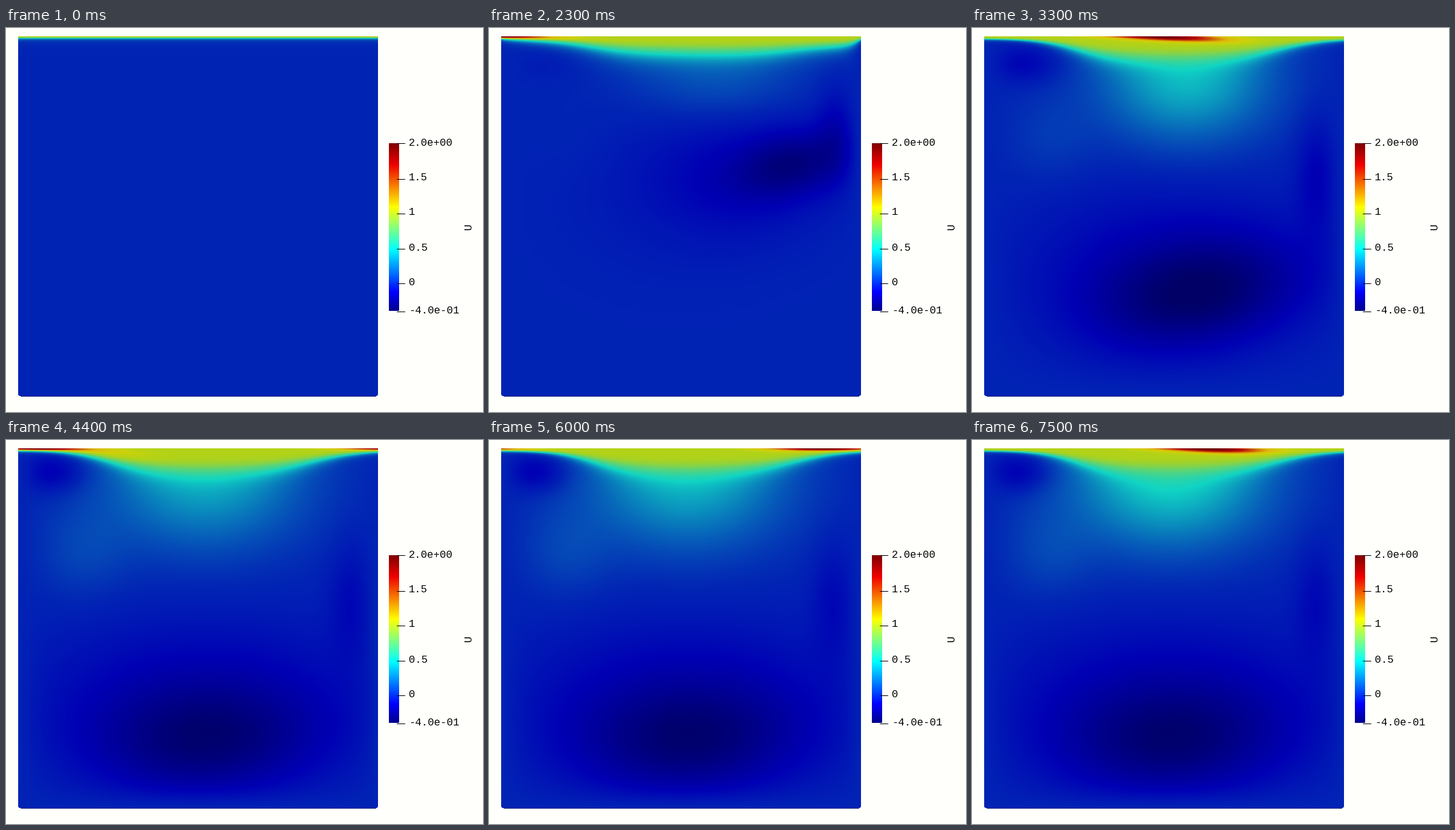
Animation of 745 by 600 pixels, one loop 8.4 s. Source, as a matplotlib script:

```python
import numpy as np
import matplotlib.pyplot as plt
from matplotlib.animation import FuncAnimation
from matplotlib.colors import LinearSegmentedColormap
from matplotlib.patches import FancyBboxPatch

W, H, DPI = 745, 600, 100
FRAMES, INTERVAL = 84, 100
START, LAST_STEP = 20, 50
PAUSES = (32, 39, 53, 63, 73)
LEFT, RIGHT, TOP, BOTTOM = 19, 581, 13, 575
SIZE = RIGHT - LEFT
U_MIN, U_MAX = -0.4, 2.0
PX = 72 / DPI


def make_cmap(name, stops):
    return LinearSegmentedColormap.from_list(name, stops, N=1024)


BAR_CMAP = make_cmap("bar", [
    (0, "#00008f"), (0.111, "#0000ff"), (0.365, "#00ffff"), (0.492, "#80ff80"),
    (0.619, "#ffff00"), (0.873, "#f00000"), (1, "#800000")])

# The surface is lit, so its colours are darker than the legend's.
FIELD_CMAP = make_cmap("field", [
    (0, "#000066"), (0.111, "#0000b4"), (0.1667, "#0224b4"), (0.365, "#10d4c4"),
    (0.492, "#64d46e"), (0.583, "#b2d218"), (0.619, "#cdd20a"), (0.69, "#deb908"),
    (0.8, "#c8460a"), (0.873, "#b40a05"), (1, "#6e0000")])

# Cell centres in stage pixels
x = np.linspace(LEFT + 1, RIGHT - 1, SIZE // 2)
y = np.linspace(TOP + 0.5, BOTTOM - 0.5, SIZE)[:, None]
depth = y - TOP
xi = (x - LEFT) / SIZE
walls = (np.tanh((x - LEFT) / 30) * np.tanh((RIGHT - x) / 22)
         * np.tanh((BOTTOM - y) / 25))

# Each blob: x, y, x radius, y radius, strength when young, rolling up, settled
CORE = np.array([(535, 98, 45, 32, -0.20), (420, 325, 125, 65, -0.30), (310, 475, 170, 85, -0.27)])
BROAD = np.array([(460, 110, 120, 60, -0.09), (320, 350, 160, 130, -0.14), (305, 400, 260, 120, -0.15)])
RIDGE = np.array([(545, 120, 30, 50, -0.06), (540, 200, 30, 90, -0.19), (540, 250, 35, 90, -0.10)])
STREAM = np.array([(340, 60, 150, 40, 0), (375, 110, 95, 80, 0.24), (310, 60, 150, 105, 0.40)])
RETURN = np.array([(130, 170, 60, 60, 0), (130, 170, 60, 60, 0.02), (120, 175, 70, 70, 0.08)])
POCKET = np.array([(75, 50, 45, 28, 0), (95, 65, 60, 30, -0.06), (70, 50, 50, 30, -0.17)])
HAZE = np.array([(330, 180, 230, 130, -0.045), (250, 350, 170, 150, -0.02), (250, 350, 170, 150, 0)])


def sigmoid(v):
    return 1 / (1 + np.exp(-v))


def bell(v):
    return np.exp(-v * v)


def mix(keys, t):
    i = min(int(t), len(keys) - 2)
    return keys[i] + (keys[i + 1] - keys[i]) * (t - i)


def blob(keys, t, gain=1):
    cx, cy, rx, ry, amp = mix(keys, t)
    return gain * amp * bell((x - cx) / rx) * bell((y - cy) / ry)


def tilted_blob(keys, t, angle):
    cx, cy, rx, ry, amp = mix(keys, t)
    c, s = np.cos(angle), np.sin(angle)
    along = (x - cx) * c + (y - cy) * s
    across = (y - cy) * c - (x - cx) * s
    return amp * np.exp(-(along / rx) ** 2 - (across / ry) ** 2)


def shear_layer(thickness, power):
    return 1 / (1 + (depth / thickness) ** power)


def lid_pulse(pos, thickness):
    """Fast patch that travels along the lid and drags fluid downstream."""
    skin = bell(depth / (2 + 0.15 * thickness))
    total = 0
    for lap in range(4):
        centre = LEFT + (pos - lap) * SIZE
        total = total + bell((x - centre - 8 * depth) / 75)
    phase = pos % 1
    centre = LEFT + phase * SIZE
    tail = bell((x - centre - 115) / 75) * bell((depth - 4 - 0.07 * (x - centre)) / 8)
    return 1.05 * total * skin + 0.33 * bell((phase - 0.15) / 0.08) * tail


def velocity(step):
    if step < 0:
        return shear_layer(3, 3) + 0 * x
    if step < 6:
        t = step / 6
    else:
        t = 2 - (1 - min((step - 6) / 16, 1)) ** 2
    grown = min(t, 1)
    pos = 0.145 + 0.056 * (step - 6)

    young = 3 + 22 * np.sqrt(xi) * np.tanh((RIGHT - x) / 20)
    mature = 4 + 34 * sigmoid((x - 165) / 32) * sigmoid((475 - x) / 40)
    thickness = young + (mature - young) * grown
    layer = shear_layer(thickness, 2.2 + 2.3 * grown)

    tilt = np.radians(-25) * (t if t < 1 else 1 - 0.9 * (t - 1))
    surge = 1 + 0.15 * np.cos(2 * np.pi * (pos - 0.53))
    inner = (tilted_blob(CORE, t, tilt) + blob(BROAD, t) + blob(RIDGE, t)
             + blob(STREAM, t, surge) + blob(RETURN, t)
             + blob(POCKET, t) + blob(HAZE, t))
    return layer + inner * walls * (1 - layer) + lid_pulse(pos, thickness)


def step_of(frame):
    if frame < START:
        return -1
    held = sum(p <= frame for p in PAUSES)
    return min(frame - START - held, LAST_STEP)


fig = plt.figure(figsize=(W / DPI, H / DPI), dpi=DPI, facecolor="#fffffc")
ax = fig.add_axes([0, 0, 1, 1])

field = ax.imshow(velocity(-1), cmap=FIELD_CMAP, vmin=U_MIN, vmax=U_MAX,
                  extent=(LEFT, RIGHT, BOTTOM, TOP), interpolation="bilinear",
                  aspect="auto")
ax.imshow(np.linspace(1, 0, 262)[:, None], cmap=BAR_CMAP, vmin=0, vmax=1,
          extent=(598, 614, 442, 180), interpolation="nearest", aspect="auto")
ax.set_xlim(0, W)
ax.set_ylim(H, 0)
ax.axis("off")

# Only the lower corners of the square are softened.
frame_box = FancyBboxPatch((LEFT, 3), SIZE, BOTTOM - 3,
                           boxstyle="round,pad=0,rounding_size=3",
                           transform=ax.transData)
field.set_clip_path(frame_box)
ax.plot([LEFT + 4, RIGHT - 4], [BOTTOM - 0.5] * 2, color="#0a1c78", lw=PX)

font = dict(family="Liberation Mono", size=16.4 * PX, color="black")
labels = [(2, "2.0e+00"), (1.5, "1.5"), (1, "1"), (0.5, "0.5"), (0, "0"), (-0.4, "-4.0e-01")]
for value, text in labels:
    ty = round(442 - (value - U_MIN) / (U_MAX - U_MIN) * 262)
    ax.plot([610, 623], [ty + 0.5 - (value == 2)] * 2, color="black", lw=PX,
            solid_capstyle="butt")
    ax.text(629, ty + 3.5, text, va="baseline", **font)
ax.text(722, 310, "U", rotation=90, ha="center", va="center", **font)


def draw(frame):
    field.set_data(np.clip(velocity(step_of(frame)), U_MIN, U_MAX))
    return [field]


anim = FuncAnimation(fig, draw, frames=FRAMES, interval=INTERVAL,
                     repeat=True, repeat_delay=0, blit=False)
plt.show()
```
